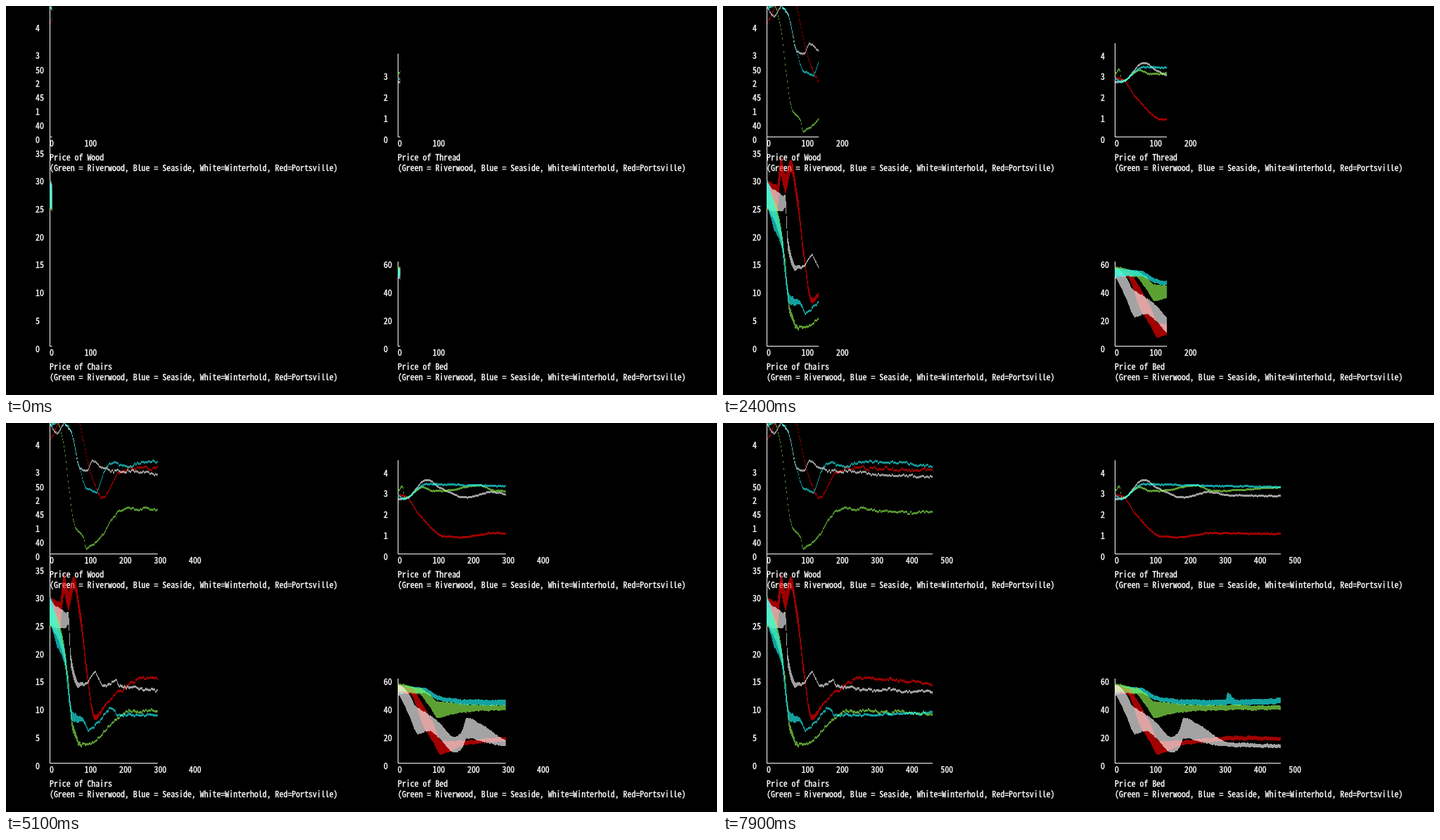
Recreate the animation shown at these times as an HTML page with a canvas. Size 1011x554 px, loop 8 s.

```html
<!DOCTYPE html>
<html lang="en">
<head>
<meta charset="utf-8">
<title>Market prices</title>
<style>
html, body { margin: 0; width: 100%; height: 100%; overflow: hidden; background: #000; }
canvas { display: block; }
</style>
</head>
<body>
<canvas id="stage" width="1011" height="554"></canvas>
<script>
const ctx = document.getElementById('stage').getContext('2d');
const LOOP = 8000, STEP = 100, TICK = 49.5, ADVANCE = 5.94, SPAN = 240;
const COLORS = { R: '#ff0000', W: '#ffffff', G: '#90fa50', C: '#1fffff' };
const LEGEND = '(Green = Riverwood, Blue = Seaside, White=Winterhold, Red=Portsville)';
const FACE = '"Noto Sans Mono CJK JP", "Noto Sans Mono CJK SC", "Noto Sans Mono", "Liberation Mono", monospace';

// Turning points of each price: x, y and, where it is not the chart's own, half thickness.
const charts = [
  {
    title: 'Price of Wood', x: 62, base: 186, unit: 39.7, by: 1, labels: 4,
    half: 1.5, jitter: 3, wander: 4, alpha: 0.58, orders: [[0, 'RWGC']],
    prices: {
      R: [[0, 22], [12, 0], [25, -30], [40, -5], [60, 77], [75, 105], [98, 72], [120, 64], [236, 68]],
      W: [[0, 5], [10, 14], [20, 0], [31, 15], [42, 62], [52, 68], [61, 53], [78, 66], [118, 70], [236, 77]],
      G: [[0, 2], [10, -2], [18, 22], [36, 150], [47, 160], [52, 178], [71, 164], [103, 122], [236, 127]],
      C: [[0, 5], [14, -2], [28, 8], [42, 62], [53, 95], [66, 97], [76, 72], [90, 54], [105, 62], [134, 55], [236, 61]]
    }
  },
  {
    title: 'Price of Thread', x: 557, base: 186, unit: 29.7, by: 1, headroom: 1.25,
    half: 1.5, jitter: 1, wander: 1, alpha: 0.62, orders: [[0, 'RWGC']],
    prices: {
      R: [[0, 103], [12, 106], [30, 131], [64, 161], [88, 163], [135, 157], [236, 158]],
      W: [[0, 108], [12, 107], [40, 81], [60, 92], [95, 106], [135, 98], [160, 103], [236, 104]],
      G: [[0, 97], [6, 90], [10, 107], [36, 91], [50, 97], [72, 96], [115, 89], [140, 97], [236, 92]],
      C: [[0, 104], [8, 108], [40, 87], [72, 88], [236, 91]]
    }
  },
  {
    title: 'Price of Chairs', x: 62, base: 484, unit: 39.7, by: 5, labels: 10,
    half: 1.6, jitter: 3, wander: 4, alpha: 0.62, orders: [[0, 'RWGC'], [60, 'GCWR'], [66, 'RWGC']],
    prices: {
      R: [[0, 270, 20], [14, 275, 20], [20, 231, 14], [26, 253, 14], [34, 228, 9], [44, 282, 10],
          [52, 352, 7], [64, 420, 4], [82, 398], [118, 369], [135, 363], [236, 371]],
      W: [[0, 272, 18], [18, 280, 13], [26, 277, 9], [30, 339, 9], [42, 374, 3], [53, 371], [64, 356],
          [75, 376], [93, 366], [100, 376], [236, 382]],
      G: [[0, 277, 15], [15, 304, 14], [25, 356, 6], [32, 432, 6], [46, 460], [71, 446], [97, 420], [114, 410], [236, 414]],
      C: [[0, 270, 20], [10, 299, 19], [20, 329, 11], [32, 417, 7], [46, 422, 3], [55, 438], [88, 407], [98, 416], [236, 413]]
    }
  },
  {
    title: 'Price of Bed', x: 557, base: 484, unit: 39.7, by: 20, labels: 3, height: 120,
    half: 3, jitter: 1.4, wander: 1.2, alpha: 0.64,
    orders: [[0, 'RWGC'], [31, 'CWRG'], [45, 'CRGW'], [57, 'RWGC'], [71, 'CRGW']],
    prices: {
      R: [[0, 379, 6], [18, 383, 4], [35, 415, 15], [50, 441, 14], [62, 462, 10], [95, 456], [170, 449], [236, 449, 2.5]],
      W: [[0, 380, 7], [15, 400, 15], [28, 424, 19], [45, 427, 11], [58, 437, 11], [80, 458, 11], [90, 452, 12],
          [98, 435, 15], [125, 444, 11], [157, 457], [236, 460, 2.5]],
      G: [[0, 377, 6], [30, 382, 4], [45, 395, 9], [57, 408, 12], [90, 406, 6], [118, 406, 4], [236, 405]],
      C: [[0, 380, 6], [35, 381, 4], [65, 394], [110, 398, 4], [157, 398, 4], [160, 392, 8], [172, 398, 4], [236, 396, 4]]
    }
  }
];

const lerp = (a, b, p) => a + (b - a) * p;

function noise(n, seed) {
  const v = Math.sin(n * 127.1 + seed * 311.7) * 43758.5453;
  return v - Math.floor(v) - 0.5;
}

function smoothNoise(x, seed) {
  const n = Math.floor(x), p = x - n;
  return lerp(noise(n, seed), noise(n + 1, seed), p * p * (3 - 2 * p));
}

// Tangent that is level at peaks and never overshoots.
function tangent(points, i) {
  if (i < 1 || i > points.length - 2) return 0;
  const slope = j => (points[j + 1][1] - points[j][1]) / (points[j + 1][0] - points[j][0]);
  const a = slope(i - 1), b = slope(i);
  return a * b > 0 ? 2 * a * b / (a + b) : 0;
}

function curve(points, x, half) {
  let i = 0;
  while (i < points.length - 2 && points[i + 1][0] <= x) i++;
  const [x0, y0, h0 = half] = points[i], [x1, y1, h1 = half] = points[i + 1];
  const d = x1 - x0, p = Math.min(1, (x - x0) / d), q = 1 - p;
  const y = y0 * q * q * (1 + 2 * p) + y1 * p * p * (3 - 2 * p)
    + d * p * q * (q * tangent(points, i) - p * tangent(points, i + 1));
  return { y, h: lerp(h0, h1, p) };
}

// One [top, height] pair for every pixel column; values hold for two columns.
function columns(chart, points, seed) {
  return Array.from({ length: SPAN }, (_, i) => {
    const { y, h } = curve(points, i, chart.half);
    const mid = y + smoothNoise(i / 8, seed) * chart.wander + noise(i >> 1, seed) * chart.jitter;
    const top = Math.round(mid - h);
    return [top, Math.max(2, Math.round(mid + h) - top)];
  });
}

charts.forEach((chart, n) => {
  chart.cols = {};
  [...'RWGC'].forEach((key, k) => {
    chart.cols[key] = columns(chart, chart.prices[key], n * 4 + k + 1);
  });
});

function drawPrice(chart, key, width) {
  ctx.fillStyle = COLORS[key];
  ctx.beginPath();
  for (let i = 0; i < width; i++) {
    const [top, height] = chart.cols[key][i];
    ctx.rect(chart.x + i, top, Math.min(1, width - i), height);
  }
  ctx.fill();
}

function axisHeight(chart, width) {
  if (!chart.headroom) return chart.height || chart.base;
  const tops = Object.values(chart.cols).flatMap(cols => cols.slice(0, Math.ceil(width)).map(c => c[0]));
  return Math.round((chart.base - Math.min(...tops)) * chart.headroom);
}

function write(text, x, y) {
  ctx.fillText(text, x, y + capHeight / 2);
  ctx.strokeText(text, x, y + capHeight / 2);
}

function drawChart(chart, step, width) {
  const { x, base } = chart;
  const height = axisHeight(chart, width);
  ctx.fillStyle = ctx.strokeStyle = '#fff';
  ctx.fillRect(x, base - height, 1, height + 1);
  ctx.fillRect(x, base, width, 1);

  const rows = chart.labels || Math.floor(height / chart.unit);
  for (let i = 0; i <= rows; i++) write(i * chart.by, x - 20, base + 4 - i * chart.unit);
  for (let i = 0; i <= 1 + width / TICK; i++) write(i * 100, x + i * TICK, base + 9);
  write(chart.title, x, base + 29);
  write(LEGEND, x, base + 44);

  const [, order] = chart.orders.filter(([from]) => from <= step).pop();
  ctx.globalAlpha = chart.alpha;
  for (const key of order) drawPrice(chart, key, width);
  ctx.globalAlpha = 1;
}

ctx.font = '100px ' + FACE;
const size = ADVANCE * 100 / ctx.measureText('0').width;
ctx.font = size + 'px ' + FACE;
ctx.lineWidth = 0.35;
const capHeight = ctx.measureText('H').actualBoundingBoxAscent;

function render(ms) {
  const step = Math.floor(ms % LOOP / STEP);
  const width = 3.5 + 2.945 * step;
  ctx.fillStyle = '#000';
  ctx.fillRect(0, 0, 1011, 554);
  for (const chart of charts) drawChart(chart, step, width);
}

const start = performance.now();
function tick() {
  render(performance.now() - start);
  requestAnimationFrame(tick);
}
tick();
</script>
</body>
</html>
```
